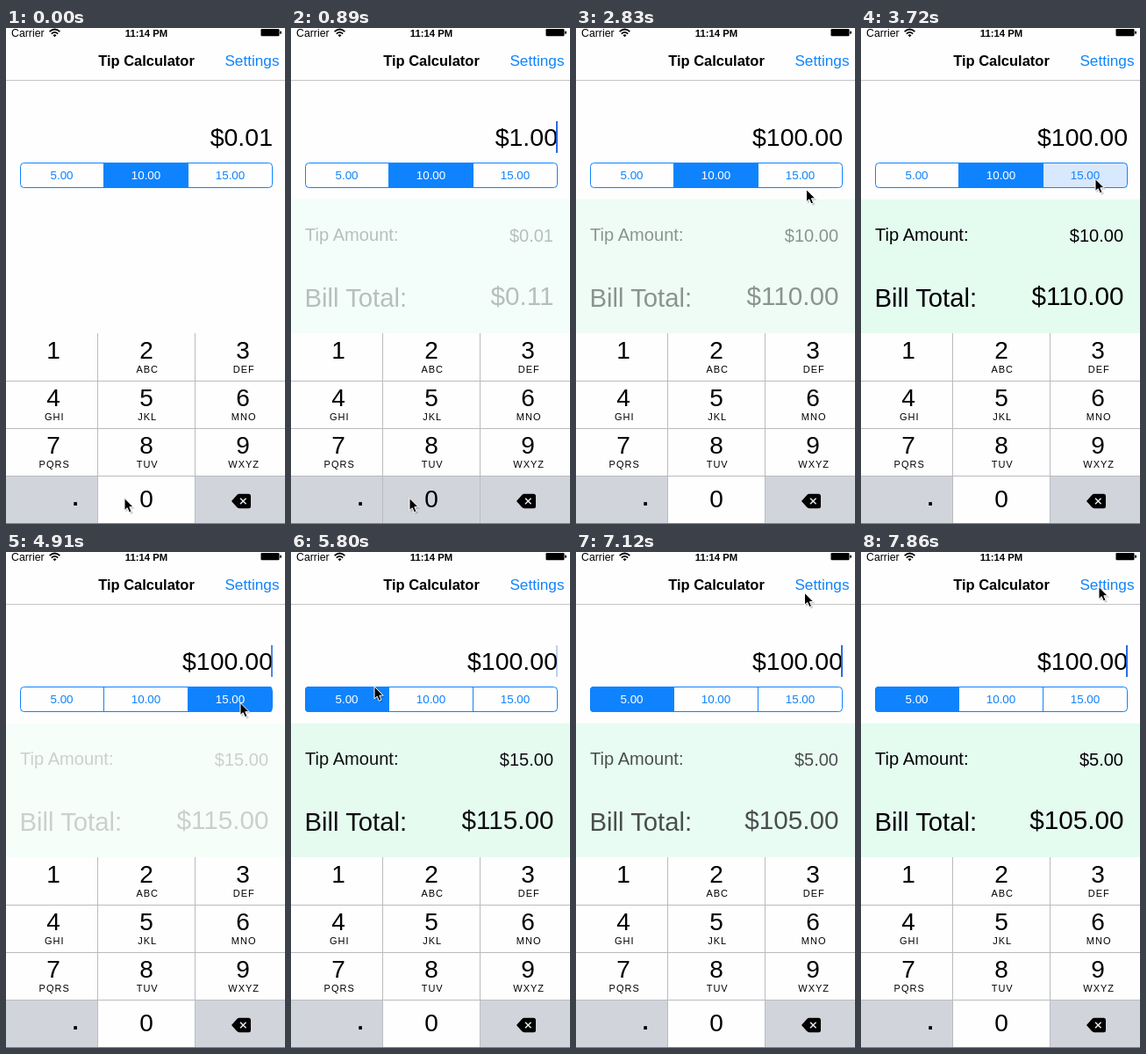
An HTML page for the animation above (8 s loop, 318 by 564 pixels).

```html
<!DOCTYPE html>
<html lang="en">
<head>
<meta charset="utf-8">
<title>Tip Calculator</title>
<style>
  html, body { margin: 0; width: 100%; height: 100%; overflow: hidden; background: #fefefe; }
  svg { display: block; width: 318px; height: 564px; font-family: "Liberation Sans", Arial, sans-serif; }
  .end { text-anchor: end; }
  .mid { text-anchor: middle; }
  .digit { font-size: 28px; text-anchor: middle; }
  .letters { font-size: 11px; letter-spacing: 1px; text-anchor: middle; }
  .seg { font-size: 13.4px; text-anchor: middle; }
</style>
</head>
<body>
<svg viewBox="0 0 318 564">
  <defs>
    <clipPath id="round"><rect x="16" y="153" width="288" height="29" rx="4"/></clipPath>
  </defs>
  <rect width="318" height="564" fill="#fefefe"/>

  <text x="6" y="9.5" font-size="12.3">Carrier</text>
  <g fill="none" stroke="#000" stroke-width="1.7">
    <path d="M49.6 4.2Q55.5 -1.2 61.4 4.2"/>
    <path d="M51.8 6.6Q55.5 3.2 59.2 6.6"/>
  </g>
  <path d="M53.5 8.2Q55.5 6.4 57.5 8.2L55.5 10.3Z"/>
  <text class="mid" x="160" y="9.5" font-size="11.3" font-weight="bold">11:14 PM</text>
  <rect x="290.5" y="1" width="21" height="8.2" rx="1.2"/>
  <rect x="312" y="3.5" width="2" height="3.2" rx="1"/>

  <text class="mid" x="160" y="43" font-size="16.5" font-weight="bold">Tip Calculator</text>
  <text class="end" x="311.5" y="43" font-size="17.2" fill="#0f83fd">Settings</text>
  <path d="M0 59.5H318" stroke="#c4c4c6"/>

  <text id="bill" class="end" x="304" y="134.3" font-size="28.5"></text>
  <rect id="caret" x="302" y="106" width="2" height="36" fill="#2a6be0"/>

  <rect id="press" y="153" height="29" fill="#d8e8fd" clip-path="url(#round)"/>
  <g fill="none" stroke="#0f83fd">
    <rect x="16.5" y="153.5" width="287" height="28" rx="4"/>
    <path d="M111.5 154V181M207.5 154V181"/>
  </g>
  <rect id="picked" y="153" height="29" fill="#0f83fd" clip-path="url(#round)"/>
  <g id="segs"></g>

  <rect id="panel" y="195" width="318" height="152" fill="#e4fbf0"/>
  <g id="result">
    <text x="16" y="241.7" font-size="20.1">Tip Amount:</text>
    <text id="tip" class="end" x="299" y="242.7" font-size="20"></text>
    <text x="15.5" y="317.2" font-size="29.3">Bill Total:</text>
    <text id="total" class="end" x="299.5" y="315.4" font-size="29.7"></text>
  </g>

  <rect y="510" width="104" height="54" fill="#d1d5db"/>
  <rect x="216" y="510" width="102" height="54" fill="#d1d5db"/>
  <rect id="zero" x="105" y="510" width="110" height="53" fill="#d1d5db"/>
  <path d="M0 401.5H318M0 455.5H318M0 509.5H318M104.5 347V564M215.5 347V564" stroke="#b9bbbe"/>
  <path d="M0 563.5H318" stroke="#777a80"/>
  <g id="keys"></g>
  <text class="mid" x="79" y="543.4" font-size="26" font-weight="bold">.</text>
  <path d="M257 538L263 531.2Q264.3 529.8 266 529.8H276.5Q279 529.8 279 532.3V543.7Q279 546.2 276.5 546.2H266Q264.3 546.2 263 544.8Z"/>
  <path d="M267 534.7L273.6 541.3M273.6 534.7L267 541.3" stroke="#e8eaee" stroke-width="1.5"/>

  <g id="mouse">
    <path d="M1.5 2V16L4.8 13L7 18.2L9.8 17L7.6 12H12Z" fill="#000" opacity=".2"/>
    <path d="M0 0V14L3.2 11.2L5.4 16.3L8 15.2L5.8 10.2H10.2Z" stroke="#fff" stroke-linejoin="round"/>
  </g>
</svg>
<script>
const LOOP = 8000, STEP = 148.3;
const FADE = 700, PAUSE = 200, PRESS = 150, TAP = 200, BLINK = 960;
const $ = id => document.getElementById(id);
const clamp = v => Math.max(0, Math.min(1, v));
const smooth = k => k * k * (3 - 2 * k);
const money = v => '$' + v.toFixed(2);
const segLeft = i => Math.round(16 + i * 95.7);

const strokes = [270, 640, 1020, 1925];
// each change fades the panel out, swaps the values and fades it in again
const changes = [
  { at: 520, bill: .1, rate: 10 },
  { at: 1020, bill: 10, rate: 10 },
  { at: 1925, bill: 100, rate: 10 },
  { at: 3870, bill: 100, rate: 15 },
  { at: 5740, bill: 100, rate: 5 },
];
const moves = [
  { from: 2150, to: 2900, x: 267, y: 171.5 },
  { from: 5000, to: 5550, x: 95, y: 153 },
  { from: 6650, to: 7200, x: 271, y: 39.5 },
];

function addText(parent, cls, x, y, str) {
  const el = document.createElementNS('http://www.w3.org/2000/svg', 'text');
  el.setAttribute('class', cls);
  el.setAttribute('x', x);
  el.setAttribute('y', y);
  el.textContent = str;
  $(parent).append(el);
  return el;
}

function place(id, rate) {
  const i = rate / 5 - 1;
  $(id).setAttribute('x', segLeft(i));
  $(id).setAttribute('width', segLeft(i + 1) - segLeft(i));
}

const labels = [5, 10, 15].map((r, i) => addText('segs', 'seg', 63.5 + i * 96, 172, r.toFixed(2)));
['', 'ABC', 'DEF', 'GHI', 'JKL', 'MNO', 'PQRS', 'TUV', 'WXYZ'].forEach((s, i) => {
  const x = 54 + 108 * (i % 3), y = 376.2 + 54 * Math.floor(i / 3);
  const cx = i % 3 === 1 ? 160 : x;
  addText('keys', 'digit', cx, y, i + 1);
  addText('keys', 'letters', cx + 1.2, y + 15.8, s);
});
addText('keys', 'digit', 160, 545.4, 0);

function caretAlpha(t) {
  if (t < strokes[0] - PRESS) return 0;
  if (t < 2400) return 1;
  const p = (t + 20) % BLINK;
  return p < BLINK / 2 ? clamp(p / 140) : clamp((700 - p) / 220);
}

function panelState(t) {
  let level = 0, shown = changes[0];
  changes.forEach((c, i) => {
    if (t < c.at) return;
    const end = Math.min(t, changes[i + 1]?.at ?? LOOP);
    const swap = c.at + level * FADE;
    if (end >= swap) shown = c;
    level = end < swap ? (swap - end) / FADE : clamp((end - swap - PAUSE) / FADE);
  });
  return { level, shown };
}

function pointer(t) {
  let x = 135, y = 534.5;
  for (const m of moves) {
    const k = smooth(clamp((t - m.from) / (m.to - m.from)));
    x += (m.x - x) * k;
    y += (m.y - y) * k;
  }
  return `translate(${x} ${y})`;
}

function draw(t) {
  $('bill').textContent = money(.01 * 10 ** strokes.filter(s => t >= s).length);
  $('caret').style.opacity = caretAlpha(t);
  $('zero').style.opacity = +strokes.some(s => t >= s - PRESS && t < s);

  const rate = changes.filter(c => t >= c.at).pop()?.rate ?? 10;
  const next = changes.find(c => t < c.at && t >= c.at - TAP)?.rate ?? rate;
  place('picked', rate);
  place('press', next);
  labels.forEach((el, i) => el.setAttribute('fill', i === rate / 5 - 1 ? '#fff' : '#0f83fd'));

  const { level, shown } = panelState(t);
  const tip = shown.bill * shown.rate / 100;
  $('tip').textContent = money(tip);
  $('total').textContent = money(shown.bill + tip);
  $('result').style.opacity = level;
  $('panel').style.opacity = level ** .6;

  $('mouse').setAttribute('transform', pointer(t));
}

function tick() {
  const t = performance.now() % LOOP;
  draw(Math.floor(t / STEP) * STEP);
  requestAnimationFrame(tick);
}
tick();
</script>
</body>
</html>
```
